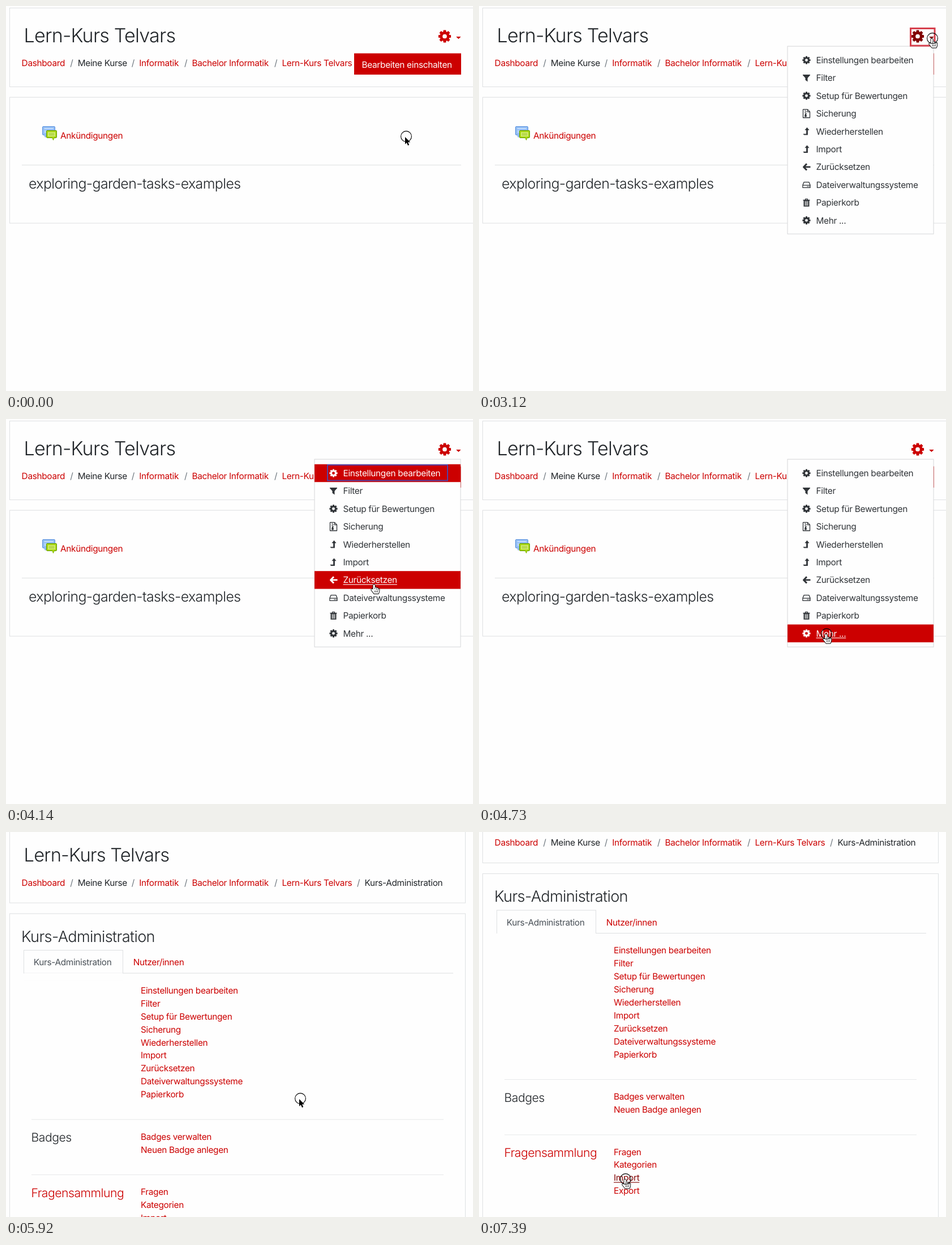
These frames come from a looping animation (825 px wide and 679 px high, 8 s). An HTML page with a canvas:

```html
<!DOCTYPE html>
<html lang="de">
<head>
<meta charset="utf-8">
<title>Kurs-Administration</title>
<style>
html, body { margin: 0; width: 100%; height: 100%; overflow: hidden; background: #fefefe; }
canvas { display: block; width: 825px; height: 679px; }
</style>
</head>
<body>
<canvas id="stage"></canvas>
<script>
const W = 825, H = 679, LOOP = 8000, TICK = 147.7;
const RED = '#cc0000', DARK_RED = '#800000', INK = '#212529', GREY = '#6c757d', LINE = '#dee0e2', PAPER = '#fefefe';
const COURSE = 'Lern-Kurs Telvars', SECTION = 'exploring-garden-tasks-examples';
const canvas = document.getElementById('stage');
const ctx = canvas.getContext('2d');
const dpr = window.devicePixelRatio || 1;
canvas.width = W * dpr;
canvas.height = H * dpr;

// Keys are [tick, ...values], linear in between
const POINTER = [
  [0, 707, 230], [3, 707, 230], [4, 765, 132], [5, 900, 90], [6, 900, 90], [7, 815, 53],
  [9, 801, 55], [10, 801, 55], [11, 801, 57], [21, 801, 57], [25, 679, 226], [32, 614, 379],
  [36, 614, 379], [37, 607, 386], [40, 520, 470], [44, 168, 654], [45, 167, 655], [49, 252, 614], [50, 259, 612]
];
const SCROLL = [[38, 0], [40, 11], [44, 81.5]];
const RING_OFF = [1, 2, 3, 9, 10, 28, 33, 35, 36, 45];
const FOCUS = 11, HOVER = 16, OPEN = 21, ENTER = 22, PRESS = 32, ADMIN_PAGE = 35;

const ADMIN = ['Einstellungen bearbeiten', 'Filter', 'Setup für Bewertungen', 'Sicherung', 'Wiederherstellen',
  'Import', 'Zurücksetzen', 'Dateiverwaltungssysteme', 'Papierkorb'];
const CRUMBS = ['Dashboard', 'Meine Kurse', 'Informatik', 'Bachelor Informatik', COURSE];
const CRUMB_X = [27.6, 126.7, 235.3, 328.4, 487.4, 633.5];
const MENU = [...ADMIN, 'Mehr ...'];
const MENU_ICONS = [gear, funnel, gear, archive, levelUp, levelUp, arrowLeft, drive, trash, gear];
const ROW = 31.4, MENU_TOP = 79.8, LINK_ROW = 22.95;

function track(keys, tick) {
  const i = keys.findIndex(key => key[0] >= tick);
  if (i < 0) return keys[keys.length - 1].slice(1);
  if (i === 0) return keys[0].slice(1);
  const a = keys[i - 1], b = keys[i], k = (tick - a[0]) / (b[0] - a[0]);
  return a.slice(1).map((v, j) => v + (b[j + 1] - v) * k);
}

function rect(x, y, w, h, color) {
  ctx.fillStyle = color;
  ctx.fillRect(x, y, w, h);
}

function frame(x, y, w, h, color, width = 1) {
  ctx.strokeStyle = color;
  ctx.lineWidth = width;
  ctx.strokeRect(x + width / 2, y + width / 2, w - width, h - width);
}

// Type is set at one base size and scaled, so proportions stay equal at every size.
function text(str, x, y, color = INK, size = 15.4, light = false, underline = false) {
  const k = size / 14;
  ctx.save();
  ctx.translate(x, y);
  ctx.scale(k, k);
  ctx.font = (light ? 300 : 400) + ' 14px Inter, "Open Sans", sans-serif';
  ctx.letterSpacing = light ? '-0.336px' : '-0.308px';
  ctx.textRendering = 'geometricPrecision';
  ctx.fillStyle = color;
  ctx.fillText(str, 0, 0);
  if (underline) ctx.fillRect(0, 1.8, ctx.measureText(str).width, 1);
  ctx.restore();
}

function shape(x, y, d, fill, stroke, width = 1) {
  const path = new Path2D(d);
  ctx.save();
  ctx.translate(x, y);
  ctx.lineJoin = 'round';
  if (stroke) {
    ctx.strokeStyle = stroke;
    ctx.lineWidth = width;
    ctx.stroke(path);
  }
  if (fill) {
    ctx.fillStyle = fill;
    ctx.fill(path, 'evenodd');
  }
  ctx.restore();
}

function gear(x, y, color, r = 7.2) {
  ctx.beginPath();
  for (let i = 0; i < 32; i++) {
    const side = i % 4, a = (i - side) * Math.PI / 16;
    const outer = side === 1 || side === 2;
    const da = (outer ? 0.2 : 0.3) * (side < 2 ? -1 : 1), k = outer ? r : r * 0.76;
    ctx.lineTo(x + Math.cos(a + da) * k, y + Math.sin(a + da) * k);
  }
  ctx.closePath();
  ctx.moveTo(x + r * 0.34, y);
  ctx.arc(x, y, r * 0.34, 0, Math.PI * 2);
  ctx.fillStyle = color;
  ctx.fill('evenodd');
}

function funnel(x, y, color) {
  shape(x, y, 'M-6.5 -6H6.5V-5L2 0V6.5L-2 3.5V0L-6.5 -5Z', color);
}

function archive(x, y, color) {
  shape(x, y, 'M-6 -7.3H2L6 -3.3V7.3H-6ZM2 -7V-3H6', null, color, 1.3);
  for (let i = 0; i < 4; i++) rect(x - 3 + i % 2 * 1.5, y - 6 + i * 1.6, 1.5, 1.6, color);
  shape(x - 1.5, y + 3, 'M-1 -3H1L2 2Q0 4 -2 2Z', color);
}

function levelUp(x, y, color) {
  shape(x, y, 'M1 -7L5 -2.2H2.4V6.5H-4.5L-6 4.3H-.4V-2.2H-3Z', color);
}

function arrowLeft(x, y, color) {
  shape(x, y, 'M.5 -5.7L-5 0L.5 5.7M-5 0H7', null, color, 2.9);
}

function drive(x, y, color) {
  shape(x, y, 'M-6.6 .8L-4.5 -4.6H4.5L6.6 .8V5H-6.6ZM-6.6 .8H6.6', null, color, 1.3);
  rect(x + 1, y + 2.3, 1.5, 1.5, color);
  rect(x + 3.6, y + 2.3, 1.5, 1.5, color);
}

function trash(x, y, color) {
  shape(x, y, 'M-2 -4.5V-6.3H2V-4.5', null, color, 1.3);
  rect(x - 6, y - 5, 12, 1.6, color);
  frame(x - 5, y - 4, 10, 11, color, 1.6);
  for (let i = -1; i < 2; i++) rect(x + i * 2.5 - 0.6, y - 2.5, 1.2, 8, color);
}

function bubble(x, y, w, h, tail, fill, edge) {
  ctx.beginPath();
  ctx.roundRect(x, y, w, h, 1.5);
  ctx.fillStyle = fill;
  ctx.fill();
  ctx.strokeStyle = edge;
  ctx.lineWidth = 1;
  ctx.stroke();
  shape(x + tail, y + h - 0.5, 'M0 0L2 4.5L4 0', fill, edge);
}

function forumIcon() {
  bubble(64.5, 212.5, 22, 15, 3, '#91bdf5', '#5b91dc');
  rect(67.5, 215.5, 16, 1.5, '#d3e7ff');
  rect(67.5, 219, 16, 5, '#b5d4fb');
  bubble(71.5, 219.5, 18, 13, 10, '#a5d511', '#649b00');
  rect(74, 222.5, 13, 7.5, '#d7ef76');
  rect(75.5, 224.5, 10, 1, '#8cbc16');
  rect(75.5, 227, 10, 1, '#8cbc16');
}

function crumbs(names) {
  names.forEach((name, i) => {
    const x = CRUMB_X[i];
    if (i) text('/', x - 13.5, 105.6, GREY);
    text(name, x, 105.6, i === 1 || i === 5 ? INK : RED);
  });
}

function coursePage(tick) {
  frame(6, 3, W, 140, LINE);
  text(COURSE, 31.5, 63.5, INK, 34.1, true);
  crumbs(CRUMBS);
  rect(615, 83.5, 189, 37.5, RED);
  text('Bearbeiten einschalten', 628.5, 108.5, '#fff');

  frame(6, 160.5, W, 223, LINE);
  forumIcon();
  text('Ankündigungen', 96, 234, RED);
  rect(28, 280, 776, 1, LINE);
  text(SECTION, 40, 322, INK, 24.9, true);

  const tint = tick >= HOVER && tick <= ENTER ? DARK_RED : RED;
  gear(775, 53.5, tint, 11.3);
  shape(799.4, 54, 'M-4.2 0H4.2L0 4.3Z', tint);
}

function menu(hover, focused) {
  rect(545, 71, 258, 331.5, PAPER);
  frame(544.5, 70.5, 259, 332, '#d5d6d8');
  MENU.forEach((label, i) => {
    const y = MENU_TOP + ROW * i, mid = y + ROW / 2;
    const active = i === hover || focused && i === 0;
    const color = active ? '#fff' : '#303438';
    if (active) rect(545, y, 258, ROW, RED);
    MENU_ICONS[i](578.5, mid, color);
    text(label, 595.5, mid + 5.5, color, 15.4, false, i === hover);
  });
  if (focused) frame(567, 80, 214, 29.5, '#5144a8', 2);
}

function adminPage(scroll, px, py) {
  let hot = false;
  const links = (labels, top) => labels.forEach((label, i) => {
    const x = 238, y = top + LINK_ROW * i, dy = py + scroll - y;
    const over = px > x && px < x + label.length * 7.5 && dy > -15 && dy < 5;
    hot = hot || over;
    text(label, x, y, over ? DARK_RED : RED, 15.4, false, over);
  });
  ctx.save();
  ctx.translate(0, -scroll);
  frame(6, 3, 806, 133.5, LINE);
  text(COURSE, 31.5, 63, INK, 32.7, true);
  crumbs([...CRUMBS, 'Kurs-Administration']);

  frame(6, 154.5, 806, 700, LINE);
  text('Kurs-Administration', 27, 204.7, INK, 27.2, true);
  rect(31, 259.5, 759, 1, LINE);
  frame(31, 219, 176, 50, LINE);
  rect(32, 259.5, 174, 12, PAPER);
  rect(31, 260.5, 176, 12, PAPER);
  text('Kurs-Administration', 48.7, 246.2, '#495057');
  text('Nutzer/innen', 224.7, 246.2, RED);

  links(ADMIN, 295.7);
  rect(45, 517.5, 728, 1, '#e8e9ea');
  text('Badges', 44.5, 557, INK, 21.2, true);
  links(['Badges verwalten', 'Neuen Badge anlegen'], 553.7);
  rect(45, 615, 728, 1, '#e8e9ea');
  text('Fragensammlung', 44.5, 654.7, RED, 21.2, true);
  links(['Fragen', 'Kategorien', 'Import', 'Export'], 651);
  ctx.restore();
  return hot;
}

function pointer(x, y, ring, hand) {
  if (hand) {
    shape(x - 1, y, 'M-1.6 9V1.8Q0 -1 1.6 1.8V6Q4 4.8 4.6 6.8Q6.6 5.8 7.2 7.8Q9.4 7.3 9.4 9.6' +
      'Q9.4 14 7.8 16.5H.2L-4.8 10.2Q-5 7 -1.6 9Z', '#fff', '#000', 1.8);
    for (let i = 0; i < 3; i++) {
      rect(x + 0.2 + i * 2.7, y + 6 + i, 0.8, 2.5, '#000');
      rect(x + 0.2 + i * 2.3, y + 11, 0.8, 3.3, '#000');
    }
  } else {
    shape(x - 2, y + 1, 'M0 0V12.8L2.9 10.1L5 15L7.2 14L5.1 9.3H9.2Z', '#000', '#fff', 1.6);
  }
  if (ring) {
    ctx.beginPath();
    ctx.arc(x, y, 9.4, 0, Math.PI * 2);
    ctx.strokeStyle = '#000';
    ctx.lineWidth = 1.1;
    ctx.stroke();
  }
}

function draw(t) {
  const tick = Math.floor(t / TICK);
  const [x, y] = track(POINTER, tick);
  const ring = !RING_OFF.includes(tick) && !(tick > FOCUS && tick < OPEN);
  let hand = tick >= HOVER;
  ctx.setTransform(dpr, 0, 0, dpr, 0, 0);
  rect(0, 0, W, H, PAPER);
  if (tick < ADMIN_PAGE) {
    coursePage(tick);
    if (tick >= OPEN) {
      const inside = x > 545 && x < 803 && y > MENU_TOP;
      menu(inside ? Math.floor((y - MENU_TOP) / ROW) : -1, tick >= ENTER && tick < PRESS);
    }
    if (tick >= FOCUS && tick < ENTER) frame(761, 38, 45.5, 33.5, '#d6404d', 3);
  } else {
    hand = adminPage(track(SCROLL, tick)[0], x, y);
  }
  pointer(x, y, ring, hand);
}

const start = performance.now();
function play() {
  draw((performance.now() - start) % LOOP);
  requestAnimationFrame(play);
}
play();
</script>
</body>
</html>
```
